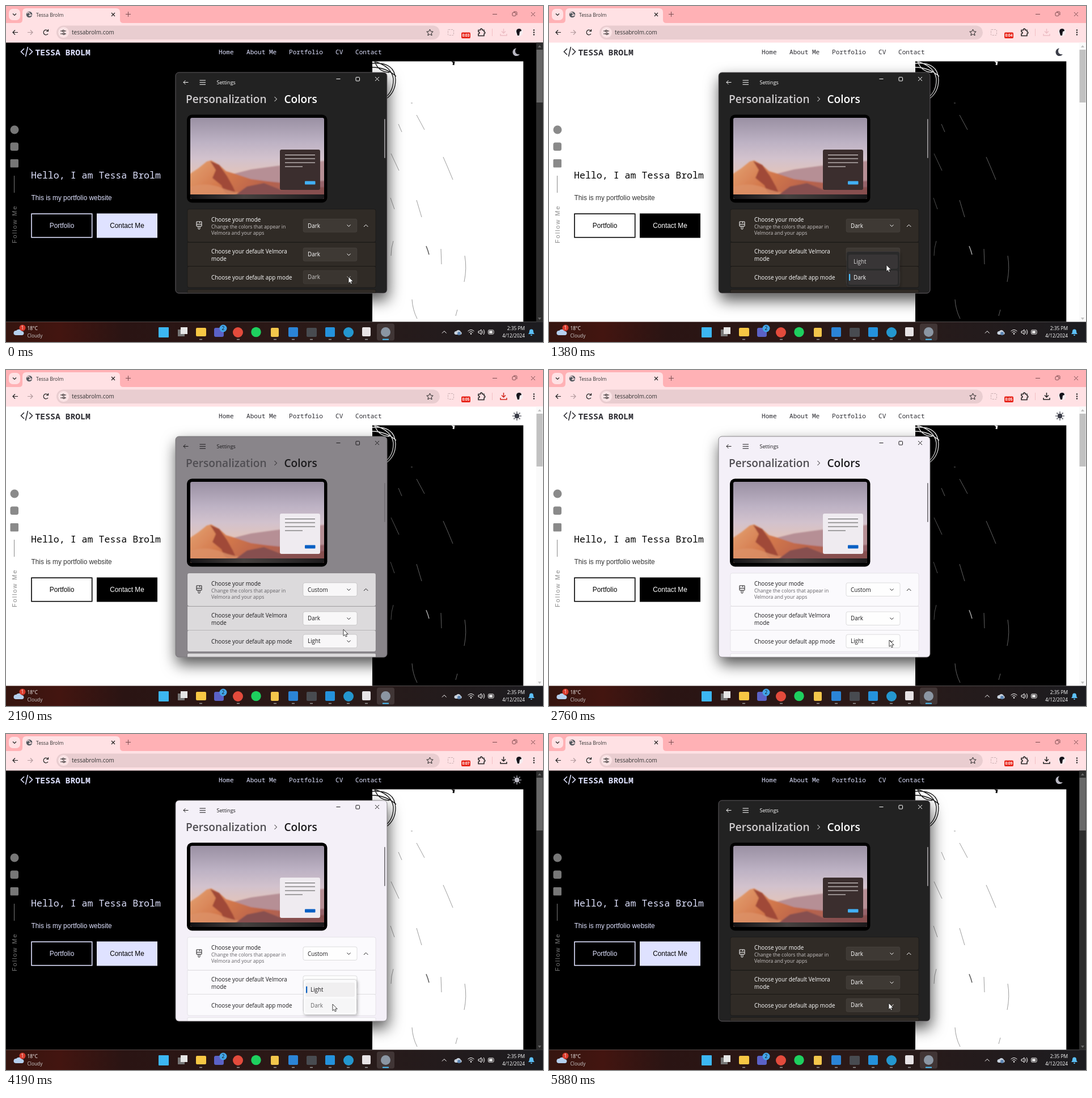
Write an HTML page that moves like this. It is 947 by 592 pixels and loops after 5.94 s.

```html
<!DOCTYPE html>
<html lang="en">
<head>
<meta charset="utf-8">
<title>Colour scheme demo</title>
<style>
html, body { margin: 0; width: 100%; height: 100%; overflow: hidden; }
svg {
  display: block; width: 947px; height: 592px;
  font: 9.9px "Open Sans", "Noto Sans", sans-serif;
  --bg: #000; --ink: #dfe2ff; --para: #dfe2ff; --btn: #dfe2ff; --btnText: #000;
  --photo: #fff; --pen: #111; --track: #2c2c2c; --thumb: #686868; --side: #777; --sky: #b9b8c2;
  --t1: #fff; --t2: #c9c5c5; --head: #cfccce; --card: rgba(120,90,60,.16); --edge: rgba(0,0,0,.35);
  --combo: rgba(255,255,255,.065); --rim: rgba(255,255,255,.05); --scroll: #a09da0;
  --pop: #2c292a; --item: #383536; --pill: #4cc2ff; --mini: #3b2e2e; --miniLine: #f4eeee; --miniBtn: #42b0f5;
}
svg.day {
  --bg: #fff; --ink: #2d2d33; --para: #333; --btn: #000; --btnText: #fff;
  --photo: #000; --pen: #eee; --track: #fafafa; --thumb: #c1c1c1; --side: #8a8a8a; --sky: #3b3d48;
}
svg.lite {
  --t1: #1c1b1d; --t2: #636166; --head: #504e53; --card: rgba(255,255,255,.7); --edge: rgba(0,0,0,.09);
  --combo: rgba(255,255,255,.8); --rim: rgba(0,0,0,.13); --scroll: #737075;
  --pop: #fafafb; --item: #f0eff0; --pill: #0a5fc0; --mini: #efebf0; --miniLine: #555; --miniBtn: #0a60c4;
}
.mono { font-family: "Noto Sans Mono", "DejaVu Sans Mono", monospace; fill: var(--ink); }
.arial { font: 11.85px "Liberation Sans", Arial, sans-serif; }
.line { fill: none; stroke: #222; stroke-width: 1.2; }
.set { fill: var(--t1); }
.set .line { stroke: var(--t1); stroke-width: 1; }
.card { fill: var(--card); stroke: var(--edge); stroke-width: .8; }
.combo { fill: var(--combo); stroke: var(--rim); }
.tray { fill: #fff; font-size: 8.4px; }
.tray .line { stroke: #fff; stroke-width: 1; }
</style>
</head>
<body>
<svg id="stage" viewBox="0 0 947 592">
  <defs>
    <linearGradient id="bar"><stop stop-color="#35150f"/><stop offset=".1" stop-color="#431510"/><stop offset=".22" stop-color="#2a1413"/><stop offset=".6" stop-color="#2b1a18"/><stop offset="1" stop-color="#1c1c20"/></linearGradient>
    <linearGradient id="dusk" x2="0" y2="1"><stop stop-color="#9a90a3"/><stop offset=".3" stop-color="#bdb2c4"/><stop offset=".5" stop-color="#d2c2cd"/><stop offset=".75" stop-color="#e6c4b6"/></linearGradient>
    <linearGradient id="ridge" x2="1" y2=".3"><stop stop-color="#e6a777"/><stop offset=".35" stop-color="#d4794d"/><stop offset=".65" stop-color="#b9624a"/><stop offset="1" stop-color="#96646a"/></linearGradient>
    <linearGradient id="desk"><stop stop-color="#141316"/><stop offset=".4" stop-color="#45403f"/><stop offset="1" stop-color="#1c1a1c"/></linearGradient>
    <filter id="drop" x="-20%" y="-20%" width="140%" height="145%"><feDropShadow dy="12" stdDeviation="13.5" flood-opacity=".68"/></filter>
    <filter id="soft" x="-20%" y="-30%" width="140%" height="170%"><feDropShadow dy="2" stdDeviation="2.5" flood-opacity=".25"/></filter>
    <filter id="haze"><feGaussianBlur stdDeviation="1.3"/></filter>
    <clipPath id="photoBox"><rect x="646" y="97.5" width="266.300" height="459"/></clipPath>
    <clipPath id="screen"><rect x="325" y="197" width="236" height="143" rx="3"/></clipPath>
    <clipPath id="reveal"><rect id="slit" x="515" width="115"/></clipPath>
    <path id="chev" d="M-3-1.5L0 1.5 3-1.5"/>
  </defs>

  <!-- browser frame -->
  <rect width="947" height="40" fill="#ffb1b5"/>
  <rect y="30" width="947" height="35" fill="#ffe1e4"/>
  <path d="M23 30q6 0 6-6V11q0-7 7-7H194q7 0 7 7V24q0 6 6 6Z" fill="#ffe1e4"/>
  <rect x="5" y="5" width="20" height="20" rx="7" fill="#ffe1e4"/>
  <use href="#chev" class="line" x="15" y="15"/>
  <circle cx="41" cy="15" r="5.3" fill="#555a60"/>
  <path d="M37 13q3-3 5 0t-2 4M42 18q1-3 4-2" fill="none" stroke="#ffe1e4" stroke-width="1.3"/>
  <text x="53" y="18.5" font-size="8.6" fill="#333">Tessa Brolm</text>
  <path class="line" d="M186 12l6 6m0-6l-6 6"/>
  <path class="line" style="stroke:#7a4c50;stroke-width:1" d="M211 14.500h9M215.500 10v9M858 14.500h8M926 11l7 7m0-7l-7 7M895 10h4.500q1.500 0 1.500 1.500V16M894.500 11.500h3q1.500 0 1.500 1.500v3q0 1.500-1.500 1.500h-3q-1.500 0-1.500-1.500v-3q0-1.500 1.500-1.500"/>
  <path class="line" d="M21 46.500H12m4-4l-4 4 4 4M74 44a4.300 4.300 0 1 0 0 5M74.500 41v3.500H71"/>
  <path class="line" style="stroke:#b39a9d" d="M38 46.500h9m-4-4l4 4-4 4"/>
  <rect x="89" y="34.500" width="676" height="24.500" rx="12.200" fill="#e9cdd0"/>
  <circle cx="101.500" cy="46.500" r="9.500" fill="#fbe3e5"/>
  <path class="line" d="M96 44h3m4 0h3M96 49h4m4 0h2"/><circle cx="101" cy="44" r="1.500" class="line"/><circle cx="102" cy="49" r="1.500" class="line"/>
  <text x="116" y="50.300" font-size="10" fill="#333">tessabrolm.com</text>
  <path class="line" style="stroke-width:1" d="M747.500 41l1.700 3.800 4 .4-3 2.700.9 4-3.600-2.100-3.600 2.100.9-4-3-2.700 4-.4Z"/>
  <rect x="779.500" y="41.500" width="10" height="10" rx="1" fill="none" stroke="#c9aeb1" stroke-dasharray="3 1.500"/>
  <rect x="803" y="46.500" width="16" height="10.500" rx="2" fill="#e8261c"/>
  <text id="clock" x="811" y="54.300" font-size="6.600" font-weight="700" fill="#fff" text-anchor="middle"></text>
  <path class="line" style="stroke-width:1.500" d="M833 42.500h3.500q0-2.500 1.700-2.500t1.700 2.500H843v3q1.800 0 1.800 1.700T843 49v3.500H833V49q2 0 2-1.700t-2-1.700Z"/>
  <path d="M857.500 40v13" stroke="#f3bfc5"/>
  <path id="save" class="line" style="stroke-width:1.500" d="M877.500 40v8m-3.500-3.500l3.500 3.500 3.500-3.500M872 49v3h11v-3"/>
  <circle cx="905" cy="46.500" r="6.500" fill="#f7eff2"/><path d="M900 45q0-5 5-5 4 0 4 4l-3 1-1 7h-3Z" fill="#15131a"/>
  <g fill="#222"><circle cx="931" cy="42.500" r="1.200"/><circle cx="931" cy="46.500" r="1.200"/><circle cx="931" cy="50.500" r="1.200"/></g>

  <!-- web page -->
  <rect y="64.500" width="947" height="492" fill="var(--bg)"/>
  <rect x="935" y="64.500" width="12" height="492" fill="var(--track)"/>
  <rect x="935.500" y="77" width="11" height="93" fill="var(--thumb)"/>
  <path d="M938 73l3-4 3 4ZM938 549l3 4 3-4Z" fill="var(--thumb)"/>
  <path d="M32 75l-5.500 5.500L32 86M41 75l5.500 5.500L41 86M38.500 72l-4 17" fill="none" stroke="var(--ink)" stroke-width="1.600"/>
  <text class="mono" x="51.500" y="87" font-size="14.750" font-weight="600">TESSA BROLM</text>
  <g class="mono" font-size="11.100" font-weight="500">
    <text x="375" y="85">Home</text><text x="424" y="85">About Me</text><text x="499" y="85">Portfolio</text><text x="581" y="85">CV</text><text x="616" y="85">Contact</text>
  </g>
  <path id="moon" d="M900 74.500a6.800 6.800 0 1 0 6 10.500q-8 1-8-6 0-3 2-4.500Z" fill="var(--sky)"/>
  <g id="sun" fill="var(--sky)" stroke="var(--sky)" stroke-width="1.700" stroke-linecap="round"><circle cx="901" cy="81" r="3.600"/><path d="M901 74v.8m0 12.400v.8M894 81h.8m12.400 0h.8M896 76l.6.6m8.800 8.800l.6.6M896 86l.6-.6m8.800-8.800l.6-.6"/></g>
  <g fill="var(--side)">
    <circle cx="15" cy="218" r="7.500"/><rect x="7.500" y="240.500" width="14.500" height="14.500" rx="3.500"/><rect x="7.500" y="270" width="14.500" height="14.500" rx="1.500"/>
    <rect x="14" y="299" width="1" height="30"/>
    <text class="arial" transform="translate(18.500 418) rotate(-90)" style="font-size:11px;letter-spacing:1.900px">Follow Me</text>
  </g>
  <text class="mono" x="44" y="304" font-size="16.600" style="fill:var(--btn)">Hello, I am Tessa Brolm</text>
  <text class="arial" x="44.500" y="342" fill="var(--para)">This is my portfolio website</text>
  <rect x="45" y="366.200" width="106.700" height="41.500" fill="var(--bg)" stroke="var(--btn)" stroke-width="1.600"/>
  <rect x="160" y="365.500" width="107" height="43" fill="var(--btn)"/>
  <g class="arial" text-anchor="middle"><text x="98.500" y="391" fill="var(--btn)">Portfolio</text><text x="213.500" y="391" fill="var(--btnText)">Contact Me</text></g>

  <!-- line drawing -->
  <g clip-path="url(#photoBox)">
    <rect x="646" y="97" width="267" height="460" fill="var(--photo)"/>
    <g fill="none" stroke="var(--pen)">
      <path stroke-width="1.300" d="M646 101Q686 98 687 130 687 152 670 164M648 97Q680 106 683 128 684 150 668 162M646 108Q670 108 688 124M650 97Q656 116 676 117"/>
      <path stroke-width="3" d="M786 96q3 4 4 2l-1 6"/>
      <path stroke-width=".7" opacity=".6" d="M714 171h3M724 192l14 26M692 208l6 14M771 266q8 18 17 40M679 260l14 30M724 342l9 30M678 338l7 20M683 414q-4 12-4 26M767 428l1 27M809 440q4 22-1 46M716 517q1 18 9 34M796 535l-3 11"/>
      <path stroke-width="1.500" opacity=".7" d="M741 423l3 8 2 7"/>
    </g>
  </g>

  <!-- settings window -->
  <g filter="url(#drop)"><rect id="pane" x="299" y="117" width="373" height="389" rx="6" stroke="#6d6a6e" stroke-width=".8"/></g>
  <g class="set">
    <path class="line" d="M321.500 134.500H313m3.500-3.500l-3.500 3.500 3.500 3.500M341.500 131h10.500m-10.500 3.700h10.500m-10.500 3.600h10.500M582.500 128.500h7M651 125l7 7m0-7l-7 7M473.500 160l4 4-4 4"/>
    <rect class="line" x="617" y="125.500" width="6.500" height="6.500" rx="1"/>
    <text x="371.500" y="138.300" font-size="9">Settings</text>
    <g font-size="19.100" font-weight="600"><text x="317" y="171.300" fill="var(--head)">Personalization</text><text x="490.500" y="171.300">Colors</text></g>
    <rect x="667" y="199" width="1.700" height="69" rx=".8" fill="var(--scroll)"/>
  </g>
  <rect x="319" y="191.500" width="247.500" height="155" rx="9"/>
  <g clip-path="url(#screen)">
    <rect x="325" y="197" width="236" height="143" fill="url(#dusk)"/>
    <g filter="url(#haze)">
      <path d="M400 296l32-8 44-6 34-4 60-6v80H400Z" fill="#b68f95"/>
      <path d="M315 302l24-16 15-12 8-2 14 8 12 11 20 6 24 8 30 4 40 4 70-6v45H315Z" fill="url(#ridge)"/>
      <path d="M360 273l10 16-6 14 16 13 4 10 16 14h10l-10-22-10-18-14-20Z" fill="#a04a38"/>
      <path d="M315 322q34-14 64-2t52 8v24H315Z" fill="#dd9268" opacity=".8"/>
      <path d="M395 340l30-22 30-6 30 12 86-6v30H395Z" fill="#87504f"/>
    </g>
    <rect x="325" y="332" width="236" height="9" fill="url(#desk)"/>
  </g>
  <rect x="483" y="253" width="71" height="71" rx="3" fill="var(--mini)"/>
  <path d="M492 262.500h53m-53 6.500h53m-53 7h53m-53 7h31" stroke="var(--miniLine)" stroke-width="1.200"/>
  <rect x="527" y="308.500" width="18.500" height="6" rx="1" fill="var(--miniBtn)"/>
  <rect class="card" x="320" y="358" width="332" height="58" rx="3"/>
  <rect class="card" x="320" y="416.500" width="332" height="42"/>
  <rect class="card" x="320" y="458.500" width="332" height="37.500" rx="3"/>
  <path class="card" d="M320 505.500V501q0-1.500 2-1.500H650q2 0 2 1.500v4.500Z"/>
  <g class="set">
    <path class="line" d="M336 380h9v8h-9Zm0 4.500h9M339 388.500v3q0 2 1.500 2t1.500-2v-3M341.500 380v2.500"/>
    <text x="362" y="379.500">Choose your mode</text>
    <g font-size="8.650" fill="var(--t2)"><text x="362" y="391.500">Change the colors that appear in</text><text x="362" y="403">Velmora and your apps</text></g>
    <text x="362" y="435.500">Choose your default Velmora</text><text x="362" y="449">mode</text>
    <text x="362" y="482">Choose your default app mode</text>
    <path class="line" d="M631 389l3.700-3.700 3.700 3.700"/>
    <g><rect class="combo" x="524" y="375" width="95" height="23.500" rx="3"/><text id="mode" x="532" y="390.500"></text><use href="#chev" class="line" x="604.500" y="387"/></g>
    <g><rect class="combo" x="524" y="426" width="95" height="23.500" rx="3"/><text x="532" y="441.300">Dark</text><use href="#chev" class="line" x="604.500" y="438"/></g>
    <g id="appBox"><rect class="combo" x="524" y="466" width="95" height="23.500" rx="3"/><text id="app" x="532" y="481.300"></text><use href="#chev" class="line" x="604.500" y="478"/></g>
    <g id="popup" clip-path="url(#reveal)">
      <rect x="524.500" y="432.500" width="94" height="62" rx="4" fill="var(--pop)" stroke="var(--rim)" filter="url(#soft)"/>
      <rect x="528" y="438" width="87" height="25" rx="3" fill="var(--item)"/>
      <rect id="lower" x="528" y="466" width="87" height="25" rx="3" fill="var(--item)"/>
      <rect id="pill" x="529" width="2.200" height="12" rx="1" fill="var(--pill)"/>
      <text id="light" x="537" y="454.300">Light</text><text id="dark" x="537" y="482">Dark</text>
    </g>
  </g>

  <!-- taskbar -->
  <rect y="556.500" width="947" height="36" fill="url(#bar)"/>
  <g class="tray">
    <path d="M17 580a4 4 0 0 1 1-8 6 6 0 0 1 10 1 3.600 3.600 0 0 1 1 7Z" fill="#b5d0ee"/>
    <circle cx="29" cy="567" r="5.500" fill="#d8392b"/><text x="29" y="570" text-anchor="middle">1</text>
    <text x="37.500" y="571">18°C</text><text x="37.500" y="583.500" fill="#ccc">Cloudy</text>
    <rect x="654" y="559.500" width="31" height="30" rx="4" fill="#fff" opacity=".12"/>
    <rect x="269" y="566" width="18" height="18" rx="1" fill="#3cb6f2"/>
    <rect x="303" y="570" width="12" height="12" fill="#777"/><rect x="308" y="566" width="12" height="12" fill="#e5e5e5"/>
    <rect x="335" y="567" width="18" height="15" rx="2" fill="#f7c744"/>
    <rect x="367" y="567" width="17" height="16" rx="3" fill="#5b62c6"/>
    <circle cx="383" cy="568" r="6.500" fill="#42a5e8"/><text x="383" y="571.200" text-anchor="middle" style="fill:#111">2</text>
    <circle cx="409" cy="575" r="9" fill="#e34b3c"/>
    <circle cx="441" cy="574.500" r="8.700" fill="#1ed05f"/>
    <rect x="467" y="567" width="14" height="16" rx="2" fill="#f3c64b"/>
    <rect x="498" y="566" width="17" height="17" rx="2" fill="#2b84d6"/>
    <rect x="530" y="567" width="18" height="16" rx="2" fill="#484b50"/>
    <rect x="563" y="566" width="17" height="17" rx="2" fill="#2492dc"/>
    <circle cx="604" cy="575" r="9" fill="#2497cf"/>
    <rect x="628" y="566" width="15" height="16" rx="2" fill="#e8e3e5"/>
    <circle cx="669.500" cy="574.500" r="8.500" fill="#8b96a3"/>
    <path d="M341 587.500h5m61 0h5m60 0h5m27 0h5m27 0h5m28 0h5m27 0h5m27 0h5" stroke="#999" stroke-width="1.600"/>
    <path d="M664 587.500h11" stroke="#4cc2ff" stroke-width="2"/>
    <path class="line" d="M769 576.500l3.800-3.800 3.800 3.800M814.500 573q5.500-5 11 0m-9 2.500q3.500-3.500 7 0M833 573h2l3-3v9l-3-3h-2ZM840 572q2 2.500 0 5m2-7q3.500 4.500 0 9"/>
    <path d="M793 579a3 3 0 0 1 1-6 4.500 4.500 0 0 1 8 1 2.700 2.700 0 0 1 0 5Z" fill="#c9d3df"/><circle cx="799" cy="577" r="3" fill="#5e87b5"/>
    <circle cx="820" cy="577.500" r="1.200"/>
    <rect class="line" x="850.500" y="571" width="9.500" height="7" rx="1.500"/><rect x="852" y="572.500" width="6" height="4"/>
    <g text-anchor="end"><text x="915" y="571">2:35 PM</text><text x="915" y="583.500">4/12/2024</text></g>
    <path d="M921 578q2-1.500 2-4.500 0-4 3.500-4t3.500 4q0 3 2 4.500ZM925 579h3q0 2-1.500 2T925 579Z" fill="#5cc0fa"/>
  </g>
  <path id="cursor" d="M0 0V11.500L2.600 9.200 4.300 13 6.300 12.100 4.600 8.400H8.200Z" fill="#fff" stroke="#111" stroke-width=".8"/>
</svg>
<script>
const LOOP = 5940;
const svg = document.getElementById('stage');
const $ = id => document.getElementById(id);
const within = (t, a, b) => t >= a && t < b;
const ramp = (t, start, span) => Math.min(1, Math.max(0, (t - start) / span));
const easeOut = p => 1 - (1 - p) ** 3;
const show = (id, on) => $(id).style.display = on ? '' : 'none';

const ticks = [900, 1900, 2900, 3900, 5000, 5700];
const path = [
  [0, 604, 477], [660, 604, 477], [1020, 595, 456], [2310, 595, 457],
  [2700, 600, 476], [3420, 599, 474], [3520, 599, 474], [3890, 576, 476],
  [4730, 576, 476], [4960, 581, 473], [5150, 581, 473], [5460, 599, 474], [LOOP, 599, 474]
];

function pointer(t) {
  const i = path.findIndex(k => k[0] > t);
  const [t0, x0, y0] = path[i - 1], [t1, x1, y1] = path[i];
  const p = ramp(t, t0, t1 - t0), e = p * p * (3 - 2 * p);
  return [x0 + (x1 - x0) * e, y0 + (y1 - y0) * e];
}

function render(t) {
  svg.classList.toggle('day', within(t, 1280, 4090));
  svg.classList.toggle('lite', within(t, 2060, 4750));

  const lit = ramp(t, 2060, 270) - ramp(t, 4750, 270);
  const mix = (a, b) => Math.round(a + (b - a) * lit);
  $('pane').setAttribute('fill', `rgb(${mix(36, 244)},${mix(33, 240)},${mix(35, 248)})`);

  const chosen = within(t, 1580, 4340);
  $('mode').textContent = chosen ? 'Custom' : 'Dark';
  $('app').textContent = chosen ? 'Light' : 'Dark';
  $('appBox').style.opacity = t < 120 ? .75 : 1;

  const sunny = within(t, 1580, 4490);
  show('sun', sunny);
  show('moon', !sunny);

  // dropdown
  const second = t >= 2860;
  const [from, to] = second ? [2860, 4340] : [120, 1580];
  show('popup', within(t, from, to + 110));
  $('popup').style.opacity = 1 - ramp(t, to, 110);
  const grow = easeOut(ramp(t, from, 240));
  $('slit').setAttribute('y', 464 - 36 * grow);
  $('slit').setAttribute('height', 28 + 44 * grow);
  $('pill').setAttribute('y', second ? 444.5 : 472);
  $('light').style.opacity = within(t, 1280, 1700) ? .8 : 1;
  $('dark').style.opacity = t >= 3890 ? .65 : 1;
  $('lower').style.opacity = t >= 3890 ? .4 : 1;

  $('clock').textContent = '0:0' + (3 + ticks.filter(k => t >= k).length);
  $('save').style.stroke = t < 1700 ? '#eebfc5' : t < 2760 ? '#d0271d' : '#222';
  $('cursor').setAttribute('transform', `translate(${pointer(t)})`);
}

function frame(now) {
  render(now % LOOP);
  requestAnimationFrame(frame);
}
render(0);
requestAnimationFrame(frame);
</script>
</body>
</html>
```
